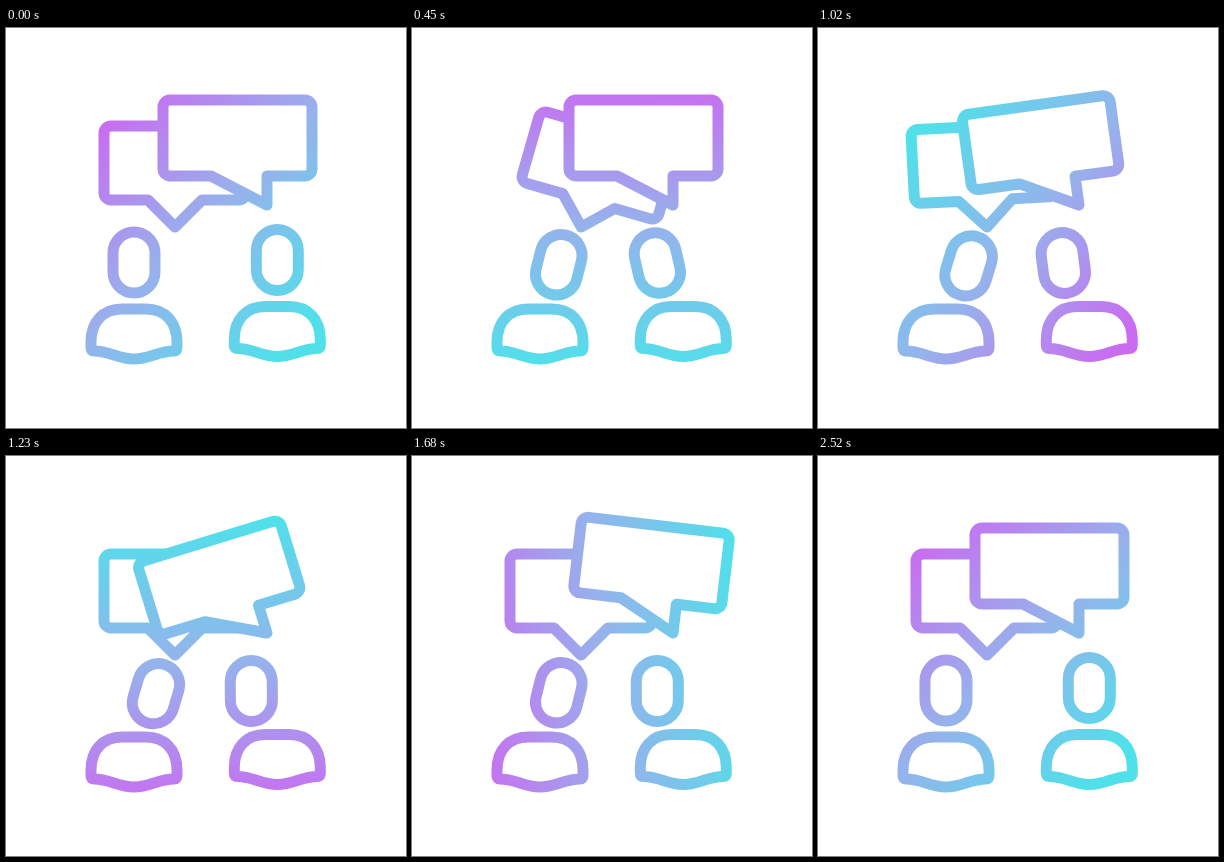
Write an HTML page with a canvas that moves like this. It is 400 px wide and 400 px high and loops after 4550 ms.

```html
<!DOCTYPE html>
<html lang="en">
<head>
<meta charset="utf-8">
<title>Two people talking</title>
<style>
  html, body { margin: 0; width: 100%; height: 100%; overflow: hidden; background: #fff; }
  canvas { display: block; width: 100vw; height: 100vh; object-fit: contain; }
</style>
</head>
<body>
<canvas id="stage" width="400" height="400"></canvas>
<script>
const ctx = document.getElementById('stage').getContext('2d');
const LOOP = 4550, ACTIVE = 2520, STEP = 30;
const RAD = Math.PI / 180;

const smooth = u => u * u * (3 - 2 * u);
const ramp = (t, from, to) => smooth(Math.min(1, Math.max(0, (t - from) / (to - from))));
const pulse = (t, from, to) => Math.sin(Math.PI * ramp(t, from, to));

// Tilts to 17 degrees, rebounds to -7 and settles
const swing = t => 17 * ramp(t, 0, 400) - 24 * ramp(t, 400, 800) + 7 * ramp(t, 800, 1200);

// One turn of the gradient: quick start, long slow finish
const turn = t => 45 + 360 * (1 - smooth((1 - t / ACTIVE) ** 1.3));

// Closed outline with rounded corners
function roundedBox(left, top, right, bottom, tail) {
  const p = new Path2D(), r = 7;
  p.moveTo(0, top);
  p.arcTo(right, top, right, bottom, r);
  p.arcTo(right, bottom, left, bottom, r);
  tail.forEach(([x, y]) => p.lineTo(x, y));
  p.arcTo(left, bottom, left, top, r);
  p.arcTo(left, top, right, top, r);
  p.closePath();
  return p;
}

// Bubbles are drawn around the tip of their tail
const leftBubble = roundedBox(-71, -102, 71, -28, [[27, -28], [0, -1], [-27, -28]]);
const rightBubble = roundedBox(-104, -105, 45, -29, [[0, -29], [0, 0], [-56, -29]]);
const head = new Path2D();
head.roundRect(-21, -30.5, 42, 61, 21);
const body = new Path2D(
  'M-43 14V8C-43-12-31-25-12-25H12C31-25 43-12 43 8V14Q43 17 40 17' +
  'C24 17 16 25 0 25C-16 25-24 17-40 17Q-43 17-43 14Z');

function gradient(deg) {
  const dx = 150 * Math.cos(deg * RAD), dy = 150 * Math.sin(deg * RAD);
  const g = ctx.createLinearGradient(200 - dx, 203 - dy, 200 + dx, 203 + dy);
  g.addColorStop(0, '#c96cf0');
  g.addColorStop(0.48, '#96b2ec');
  g.addColorStop(0.96, '#50e0ea');
  return g;
}

// Only the shape is transformed, so the gradient spans the whole stage
function part(shape, x, y, deg = 0, sx = 1, sy = 1) {
  const p = new Path2D();
  p.addPath(shape, new DOMMatrix().translate(x, y).rotate(deg).scale(sx, sy));
  ctx.fill(p);
  ctx.stroke(p);
}

function drawLeftPerson(t) {
  const lean = 14 * (ramp(t, 0, 400) - ramp(t, 2010, 2500)) + 3 * pulse(t, 450, 1680);
  part(body, 128, 306);
  part(head, 128 + 77.5 * Math.sin(lean * RAD), 312 - 77.5 * Math.cos(lean * RAD), lean);
}

function drawRightPerson(t) {
  const lean = ramp(t, 0, 400) - ramp(t, 1700, 2200);
  const tilt = -13 * (ramp(t, 0, 400) - ramp(t, 800, 1280));
  const squash = 0.035 * pulse(t, 1700, 2320);
  part(body, 271.3, 303.5, 0, 1 + squash, 1 - squash / 3);
  part(head, 271.3 - 26 * lean, 232 + 3 * lean + 70 * squash, tilt, 1 + 1.6 * squash, 1 - squash);
}

function draw(t) {
  ctx.fillStyle = '#fff';
  ctx.fillRect(0, 0, 400, 400);
  ctx.strokeStyle = gradient(turn(t));
  ctx.lineWidth = 11;
  ctx.lineJoin = 'round';
  drawLeftPerson(t);
  drawRightPerson(t);
  part(leftBubble, 169, 200, swing(t));
  part(rightBubble, 261, 177, -swing(t - 830));
}

const start = performance.now();
function tick() {
  const t = (performance.now() - start) % LOOP;
  draw(Math.min(ACTIVE, Math.floor(t / STEP) * STEP));
  requestAnimationFrame(tick);
}
tick();
</script>
</body>
</html>
```
